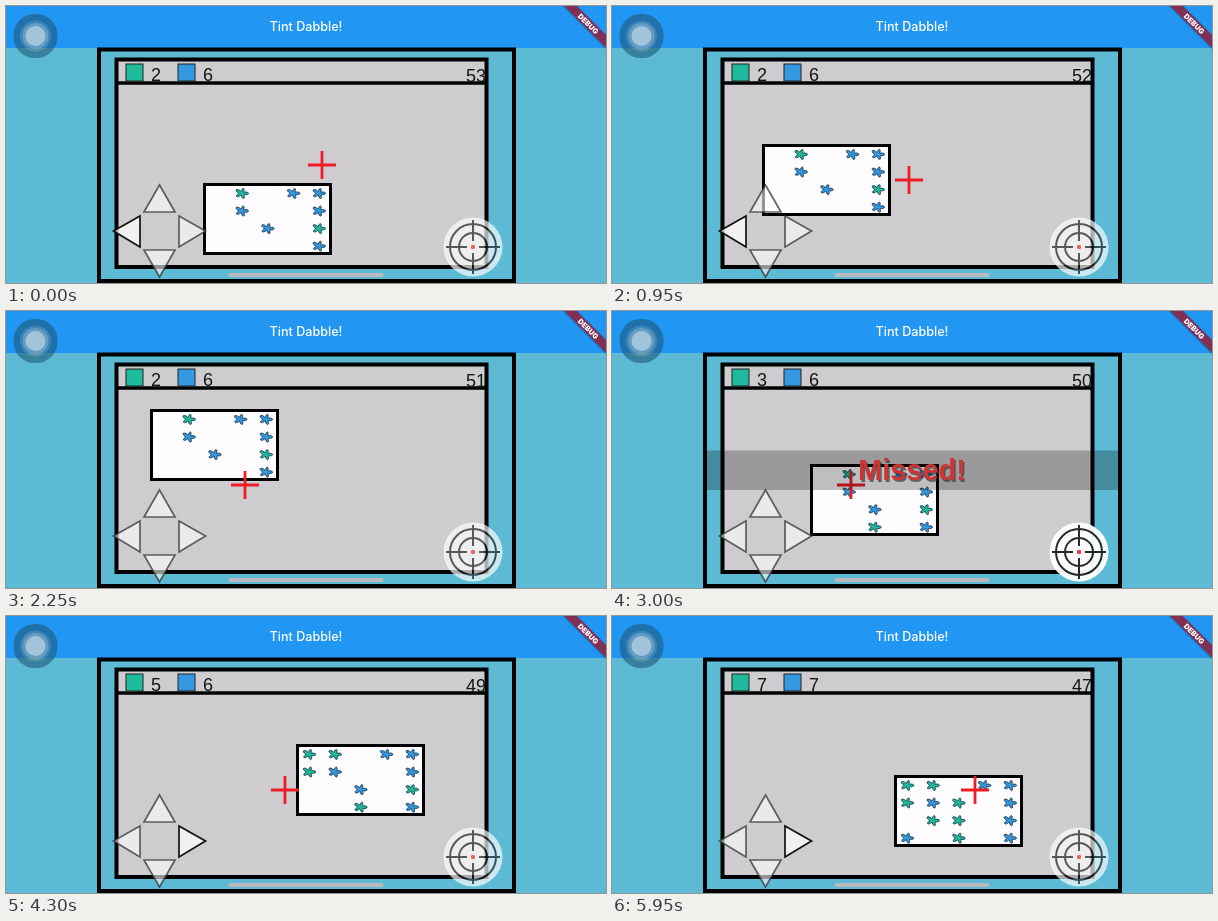
Write an HTML page that moves like this. It is 600 by 277 pixels and loops after 6000 ms.

```html
<!DOCTYPE html>
<html lang="en">
<head>
<meta charset="utf-8">
<style>
  html, body { margin: 0; width: 100%; height: 100%; overflow: hidden; background: #5dbad5; }
  svg { display: block; width: 600px; height: 277px; }
  .ui { font-family: Inter, Roboto, sans-serif; fill: #fff; text-anchor: middle; }
  .game { font-family: "Liberation Sans", Arial, sans-serif; font-size: 18px; fill: #161616; }
  .pad path { fill: #fff; fill-opacity: .58; stroke: #333; stroke-width: 1.7; stroke-opacity: .75; stroke-linejoin: miter; }
  .pad path.down { fill-opacity: .72; stroke: #111; stroke-opacity: 1; }
</style>
</head>
<body>
<svg viewBox="0 0 600 277">
  <defs>
    <path id="splat" stroke="#17364a" stroke-width=".9" />
    <clipPath id="stage"><rect width="600" height="277" /></clipPath>
  </defs>
  <rect width="600" height="277" fill="#5dbad5" />
  <rect width="600" height="42" fill="#2196f3" />
  <text class="ui" x="300" y="25" font-size="12.6" font-weight="500">Tint Dabble!</text>

  <g fill="none" stroke="#000" stroke-width="4">
    <rect x="93" y="43.5" width="415" height="231.5" />
    <rect x="110.5" y="53.5" width="370" height="207.5" fill="#cecccf" />
    <path d="M109 77H482" stroke-width="3.5" />
  </g>
  <g stroke="#222" stroke-width="1">
    <rect x="120" y="58" width="17" height="17" fill="#1fba9b" />
    <rect x="172" y="58" width="17" height="17" fill="#3498e0" />
  </g>
  <g class="game">
    <text id="green" x="145" y="75"></text>
    <text id="blue" x="197" y="75"></text>
    <text id="clock" x="480" y="76" text-anchor="end"></text>
  </g>

  <g id="board">
    <rect x="1.5" y="1.5" width="126" height="69" fill="#fffdff" stroke="#000" stroke-width="3" />
    <g id="splats"></g>
  </g>
  <path id="aim" d="M-14 0H14M0-14V14" stroke="#ee1c24" stroke-width="2.8" />

  <g class="pad">
    <path d="M153.5 179L169 206H138Z" />
    <path d="M153.5 271L138 244H169Z" />
    <path id="left" d="M107.5 225L134 210V241Z" />
    <path id="right" d="M199.5 225L173 210V241Z" />
  </g>
  <g id="fire" transform="translate(467 241)">
    <circle r="29.5" fill="#fff" />
    <g fill="none" stroke="#222" stroke-width="2">
      <circle r="23" />
      <circle r="14" />
      <path d="M-27 0H-6M6 0H27M0-27V-6M0 6V27" />
    </g>
    <circle r="2.2" fill="#f0303a" />
  </g>

  <g id="missed">
    <rect x="91" y="139.5" width="419" height="39.5" fill-opacity=".25" />
    <g font-family="'Liberation Sans', Arial, sans-serif" font-size="29" font-weight="700" text-anchor="middle">
      <text x="301.5" y="170.5" fill="#333" fill-opacity=".65">Missed!</text>
      <text x="300" y="169" fill="#cb3634">Missed!</text>
    </g>
  </g>

  <rect x="222.500" y="267" width="155" height="4" rx="2" fill="#b9bac0" />
  <g transform="translate(29.5 30)">
    <rect x="-22" y="-22" width="44" height="44" rx="21" fill="#1c5678" fill-opacity=".58" />
    <circle r="15.500" fill="#fff" fill-opacity=".14" />
    <circle r="13" fill="#fff" fill-opacity=".2" />
    <circle r="10" fill="#fff" fill-opacity=".4" />
  </g>
  <g clip-path="url(#stage)">
    <g transform="translate(600 0) rotate(45)">
      <rect x="-40" y="20" width="80" height="11" fill-opacity=".18" />
      <rect x="-40" y="20.7" width="80" height="8.9" fill="#822f55" />
      <text class="ui" y="27.8" font-size="7.3" font-weight="900">DEBUG</text>
    </g>
  </g>
</svg>
<script>
  const $ = id => document.getElementById(id);
  const LOOP = 6000, STEP = 50;
  const GREEN = '#1fba9b', BLUE = '#3498e0';

  // Paths are [time, value] pairs joined by straight lines.
  const boardX = [[0, 197], [950, 150], [1656, 112], [2250, 144], [3000, 198], [4300, 290], [5100, 347], [5157, 352], [5950, 282]];
  const boardY = [[0, 177], [950, 138], [1925, 78], [2250, 98], [3000, 153], [3492, 191], [4300, 128], [4990, 78], [5100, 86], [5950, 159]];
  const aimX = [[0, 316], [570, 316], [2110, 239], [3516, 239], [5950, 363]];
  const aimY = [[0, 159], [300, 174]];

  // Shots: time, colour, column, row; a later shot covers an earlier one.
  const shots = [
    [0, GREEN, 1, 0], [0, BLUE, 3, 0], [0, BLUE, 4, 0], [0, BLUE, 1, 1],
    [0, BLUE, 4, 1], [0, BLUE, 2, 2], [0, GREEN, 4, 2], [0, BLUE, 4, 3],
    [2600, GREEN, 2, 3], [3400, GREEN, 0, 0], [3900, GREEN, 0, 1],
    [4600, BLUE, 0, 3], [5400, GREEN, 2, 1], [5700, GREEN, 1, 2],
    [5700, GREEN, 2, 2], [5700, BLUE, 4, 2]
  ];

  function at(path, t) {
    const i = path.findIndex(p => p[0] > t);
    if (i < 0) return path[path.length - 1][1];
    const [t0, a] = path[i - 1], [t1, b] = path[i];
    return a + (b - a) * (t - t0) / (t1 - t0);
  }

  const within = (t, from, to) => t >= from && t < to;
  const place = (id, x, y) => $(id).setAttribute('transform', `translate(${x} ${y})`);

  function splatPath() {
    const points = [];
    for (let i = 0; i < 60; i++) {
      const a = i * Math.PI / 30;
      const r = 3.9 + 1.7 * Math.cos(5 * a) + .5 * Math.sin(2 * a + 1);
      points.push((r * 1.13 * Math.cos(a)).toFixed(2) + ' ' + (r * Math.sin(a)).toFixed(2));
    }
    return 'M' + points.join('L') + 'Z';
  }

  $('splat').setAttribute('d', splatPath());
  let shown = '';

  function drawSplats(t) {
    const cells = new Map();
    for (const [time, color, col, row] of shots)
      if (t >= time) cells.set(col + ',' + row, [color, col, row]);
    const list = [...cells.values()];
    const html = list.map(([color, col, row]) =>
      `<use href="#splat" x="${13 + 25.7 * col}" y="${10.3 + 17.6 * row}" fill="${color}"/>`).join('');
    if (html === shown) return;
    $('splats').innerHTML = shown = html;
    const count = color => list.filter(c => c[0] === color).length;
    $('green').textContent = count(GREEN);
    $('blue').textContent = count(BLUE);
  }

  function draw(now) {
    const t = Math.floor(now % LOOP / STEP) * STEP;
    place('board', at(boardX, t), at(boardY, t));
    place('aim', at(aimX, t), at(aimY, t));
    drawSplats(t);
    $('clock').textContent = 53 - Math.floor((t + 350) / 1000);
    $('left').classList.toggle('down', t < 2110);
    $('right').classList.toggle('down', t >= 3500);
    $('fire').setAttribute('opacity', within(t, 2700, 3150) ? .95 : .68);
    $('missed').style.display = within(t, 2750, 3500) ? '' : 'none';
  }

  const start = performance.now();
  function tick() {
    draw(performance.now() - start);
    requestAnimationFrame(tick);
  }
  tick();
</script>
</body>
</html>
```
